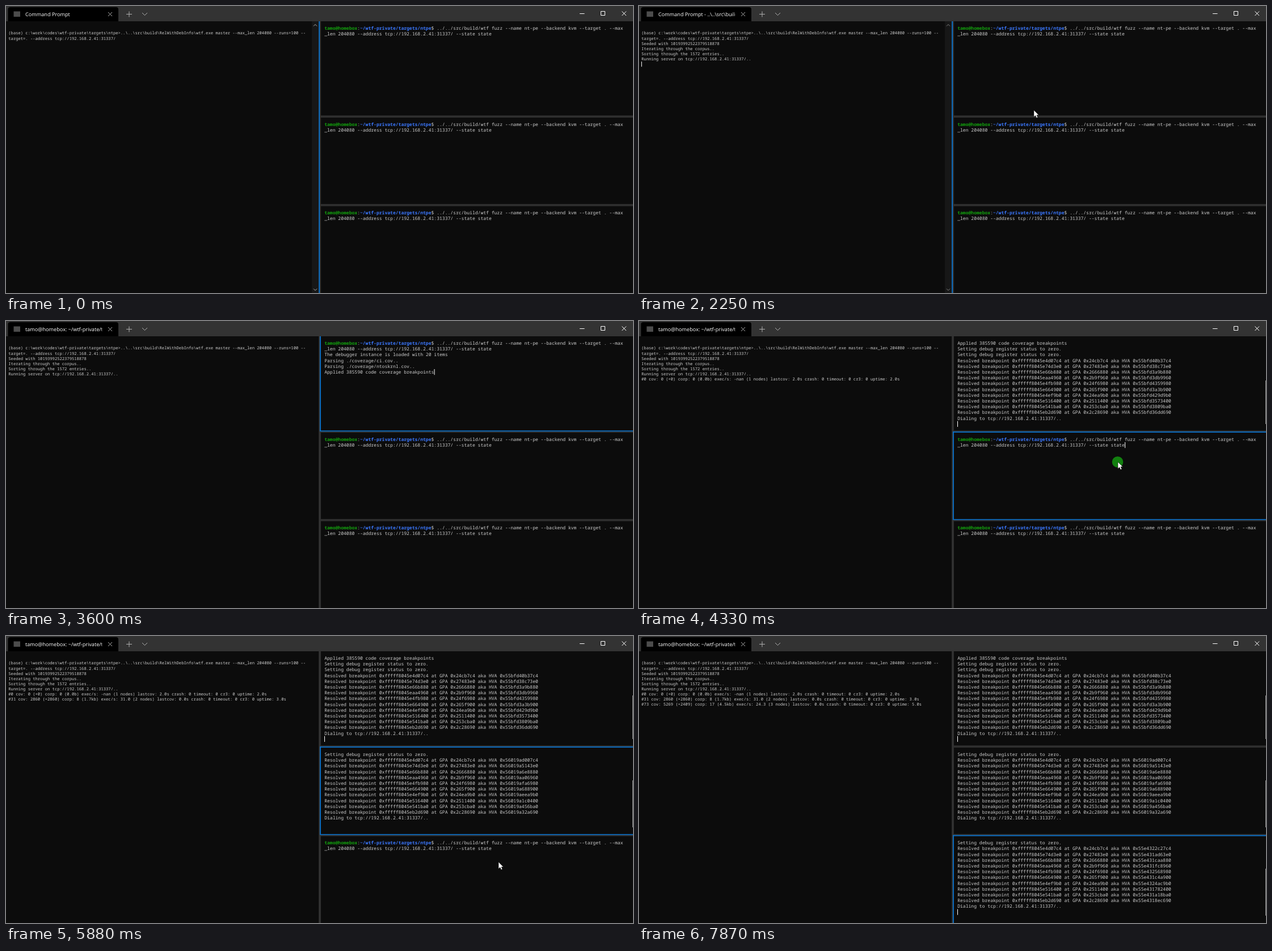
An HTML page for the animation above (8 s loop, 1105 px wide and 507 px high).

```html
<!DOCTYPE html>
<html lang="en">
<head>
<meta charset="utf-8">
<title>Terminal panes</title>
<style>
  html, body { margin: 0; width: 100%; height: 100%; overflow: hidden; background: #0c0c0c; }
  svg { display: block; width: 1105px; height: 507px; }
  text { white-space: pre; text-rendering: geometricPrecision; fill: #ccc; }
  .term { font-family: "Noto Sans Mono", "DejaVu Sans Mono", monospace; font-weight: 500; }
  .tab { font: 9.14px "Open Sans", "Noto Sans", sans-serif; fill: #fff; }
  .user { fill: #13a10e; font-weight: 700; }
  .path { fill: #3b78ff; font-weight: 700; }
  .line { fill: none; stroke: #fff; stroke-width: 1; }
  .dim { stroke: #b0b0b0; }
</style>
</head>
<body>
<svg id="stage" viewBox="0 0 1105 507" xmlns="http://www.w3.org/2000/svg"></svg>
<script>
const LOOP = 8000;
const BLUE = '#0c74cf', GREY = '#333';
const LEFT = { x: 4.3, top: 43.4, row: 9.12, col: 4.296, base: 7 };
const RIGHT = { x: 561.2, row: 10.2, col: 4.838, base: 8 };
const URL_ = 'tcp://192.168.2.41:31337/';
const DIR = '~/wtf-private/targets/ntpe';
const HOST = 'tamo@homebox';

const leftLines = [
  [0, '(base) c:\\work\\codes\\wtf-private\\targets\\ntpe>..\\..\\src\\build\\RelWithDebInfo\\wtf.exe master --max_len 204080 --runs=100 --'],
  [0, `target=. --address ${URL_}`],
  [1380, 'Seeded with 10193992522379518878'],
  [1380, 'Iterating through the corpus..'],
  [1450, 'Sorting through the 1572 entries..'],
  [2050, `Running server on ${URL_}..`],
  [3670, '#0 cov: 0 (+0) corp: 0 (0.0b) exec/s: -nan (1 nodes) lastcov: 2.0s crash: 0 timeout: 0 cr3: 0 uptime: 2.0s'],
  [5260, '#31 cov: 2860 (+2860) corp: 8 (1.7kb) exec/s: 31.0 (2 nodes) lastcov: 0.0s crash: 0 timeout: 0 cr3: 0 uptime: 3.0s'],
  [7080, '#73 cov: 5269 (+2409) corp: 17 (4.5kb) exec/s: 24.3 (3 nodes) lastcov: 0.0s crash: 0 timeout: 0 cr3: 0 uptime: 5.0s']
];

const words = s => s.split(' ');
const code = words('4d07c4 74d3e0 66b880 aa4960 4fb980 664900 4ef9b0 516400 541ba0 b2d690');
const guest = words('24cb7c4 27483e0 2666880 2b9f960 24f6980 265f900 24ea9b0 2511400 253cba0 2c28690');

const fuzzLines = (prefix, host) => [
  `<tspan class="user">${HOST}</tspan>:<tspan class="path">${DIR}</tspan>$ ../../src/build/wtf fuzz --name nt-pe --backend kvm --target . --max`,
  `_len 204080 --address ${URL_} --state state`,
  'The debugger instance is loaded with 20 items',
  'Parsing ./coverage/ci.cov..',
  'Parsing ./coverage/ntoskrnl.cov..',
  'Applied 385590 code coverage breakpoints',
  'Setting debug register status to zero.',
  'Setting debug register status to zero.',
  ...words(host).map((h, i) =>
    `Resolved breakpoint 0xfffff8045e${code[i]} at GPA 0x${guest[i]} aka HVA 0x${prefix}${h}`),
  `Dialing to ${URL_}..`
];

// steps: enter key, three status lines, breakpoints applied, all output
const panes = [
  { y0: 27, y1: 195.3, top: 34, rows: 15, focus: [2590, 4330], thumb: [105, 182],
    steps: [3070, 3130, 3200, 3270, 3600, 3670], caret: [[2590, LOOP]],
    lines: fuzzLines('55bfd', '40b37c4 38c73e0 3a9b880 3db9960 4359980 3a3b900 429d9b0 3573400 3809ba0 36dd690') },
  { y0: 195.3, y1: 351.7, top: 203.9, rows: 13, focus: [4330, 6150], thumb: [255, 338],
    steps: [4860, 4930, 4990, 5060, 5190, 5260], caret: [[4330, 5590]],
    lines: fuzzLines('56019a', 'd007c4 5143e0 6e8880 a06960 fa6980 688900 eea9b0 1c0400 456ba0 32a690') },
  { y0: 351.7, y1: 507, top: 360.1, rows: 13, focus: [6150, LOOP], thumb: [411, 494],
    steps: [6670, 6740, 6800, 6870, 7010, 7080], caret: [[6150, 7350], [7870, LOOP]],
    lines: fuzzLines('55e43', '22c27c4 1ad63e0 1caa880 1fc8960 2568980 1c4a900 24ac9b0 1782400 1a18ba0 18ec690') }
];

// pointer moves: start, end, hidden at, from, to
const moves = [
  [70, 270, 1380, [592, 477], [410, 287]],
  [1980, 2390, 3070, [410, 287], [796, 148]],
  [3670, 4000, 4860, [796, 148], [844, 249]],
  [5520, 5880, 6670, [850, 299], [868, 399.3]],
  [7350, 7350, 7410, [878, 457], [878, 457]]
];
const clicks = [[530, 790, 410, 286], [2590, 2860, 795, 147], [4330, 4530, 843.5, 249], [6150, 6340, 868, 398.6]];

const within = (t, [a, b]) => t >= a && t < b;
const rect = (x, y, w, h, fill) => `<rect x="${x}" y="${y}" width="${w}" height="${h}" fill="${fill}"/>`;
const path = (d, cls = 'line') => `<path class="${cls}" d="${d}"/>`;
const write = (grid, top, row, s) =>
  `<text class="term" font-size="${grid.col / 0.6}" x="${grid.x}" y="${top + row * grid.row + grid.base}">${s}</text>`;
const caret = (grid, top, row, col) =>
  rect(grid.x + col * grid.col - .2, top + row * grid.row, 1, grid.row, '#fff');

function titleBar(t) {
  const title = t < 1450 ? 'Command Prompt'
    : t < 2660 ? 'Command Prompt - ..\\..\\src\\build\\RelWithDebInfo' : `${HOST}: ${DIR}`;
  return rect(0, 0, 1105, 27, GREY)
    + '<path d="M3.5 27V6q0-4 4-4H194q4 0 4 4V27Z"/>'
    + rect(13.5, 9.5, 11.5, 9.5, '#4c4c4c')
    + '<clipPath id="label"><path d="M34 0H169.3V27H34Z"/></clipPath>'
    + `<text class="tab" x="34" y="18.2" clip-path="url(#label)">${title}</text>`
    + path('M180 11l7 7m0-7l-7 7', 'line dim')
    + path('M212 14.5h10m-5-5v10M240 12l4.5 4.5l4.5-4.5', 'line dim')
    + path('M1011 13.5h8.5M1048.5 9.5h7v7h-7ZM1085.5 9.5l7.5 7.5m0-7.5l-7.5 7.5');
}

function leftPane(t) {
  const shown = leftLines.filter(([at]) => t >= at);
  let out = shown.map(([, s], i) => write(LEFT, LEFT.top, i, s)).join('');
  if (within(t, [600, 1120])) out += caret(LEFT, LEFT.top, 1, 44);
  if (within(t, [1380, 1980]) || within(t, [2050, 2590])) out += caret(LEFT, LEFT.top, shown.length, 0);
  if (t < 2590) out = rect(539, 27, 12.2, 480, '#171717') + out;
  if (t < 2390) {
    const fade = Math.min(1, (2390 - t) / 200);
    out += `<g opacity="${fade.toFixed(1)}">` + path('M542 35.5l3-3l3 3M542 499.5l3 3l3-3', 'line dim') + '</g>';
  }
  return out + rect(551.2, 27, 1.9, 480, t < 2590 ? BLUE : GREY);
}

function fuzzPane(t, p, index) {
  const color = within(t, p.focus) ? BLUE : GREY;
  const passed = p.steps.filter(at => t >= at).length;
  const done = passed === p.steps.length;
  const count = done ? p.lines.length : 2 + Math.max(0, passed - 1);
  const scroll = done ? count + 1 - p.rows : 0;
  let out = rect(553.1, p.y0, 1.8, p.y1 - p.y0, color);
  if (index > 0) out += rect(553.1, p.y0, 552, 1.8, color);
  if (index < 2) out += rect(553.1, p.y1 - 1.8, 552, 1.8, color);
  out += p.lines.slice(scroll, count).map((s, i) => write(RIGHT, p.top, i, s)).join('');
  if (p.caret.some(span => within(t, span))) {
    const atEnd = passed === 0 || passed === 5;
    out += caret(RIGHT, p.top, count - scroll - (atEnd ? 1 : 0), atEnd ? p.lines[count - 1].length : 0);
  }
  if (done) out += rect(1104, p.thumb[0], 1, p.thumb[1] - p.thumb[0], '#a0a0a0');
  return out;
}

function pointer(t) {
  let out = '';
  const click = clicks.find(c => within(t, c));
  if (click) out += `<circle cx="${click[2]}" cy="${click[3]}" r="9.8" fill="#12800f"/>`;
  const move = moves.find(([start, , hide]) => within(t, [start, hide]));
  if (move) {
    const [start, end, , from, to] = move;
    const steps = Math.max(1, Math.round((end - start) / 67));
    const k = end > start ? Math.min(1, Math.floor((t - start) / (end - start) * steps + .05) / steps) : 1;
    const ease = k * k * (3 - 2 * k);
    const [x, y] = from.map((a, i) => a + (to[i] - a) * ease);
    out += `<path transform="translate(${x} ${y})" d="M0 0V12L2.8 9.4L4.7 13.6L6.8 12.7L5 8.6H8.6Z" fill="#fff" stroke="#000" stroke-width=".5"/>`;
  }
  return out;
}

const stage = document.getElementById('stage');
let last = '';
function draw(t) {
  const picture = rect(0, 0, 1105, 507, '#0c0c0c') + leftPane(t)
    + panes.map((p, i) => fuzzPane(t, p, i)).join('') + titleBar(t) + pointer(t);
  if (picture !== last) stage.innerHTML = last = picture;
}

const begin = performance.now();
function tick() {
  draw((performance.now() - begin) % LOOP);
  requestAnimationFrame(tick);
}
tick();
</script>
</body>
</html>
```
